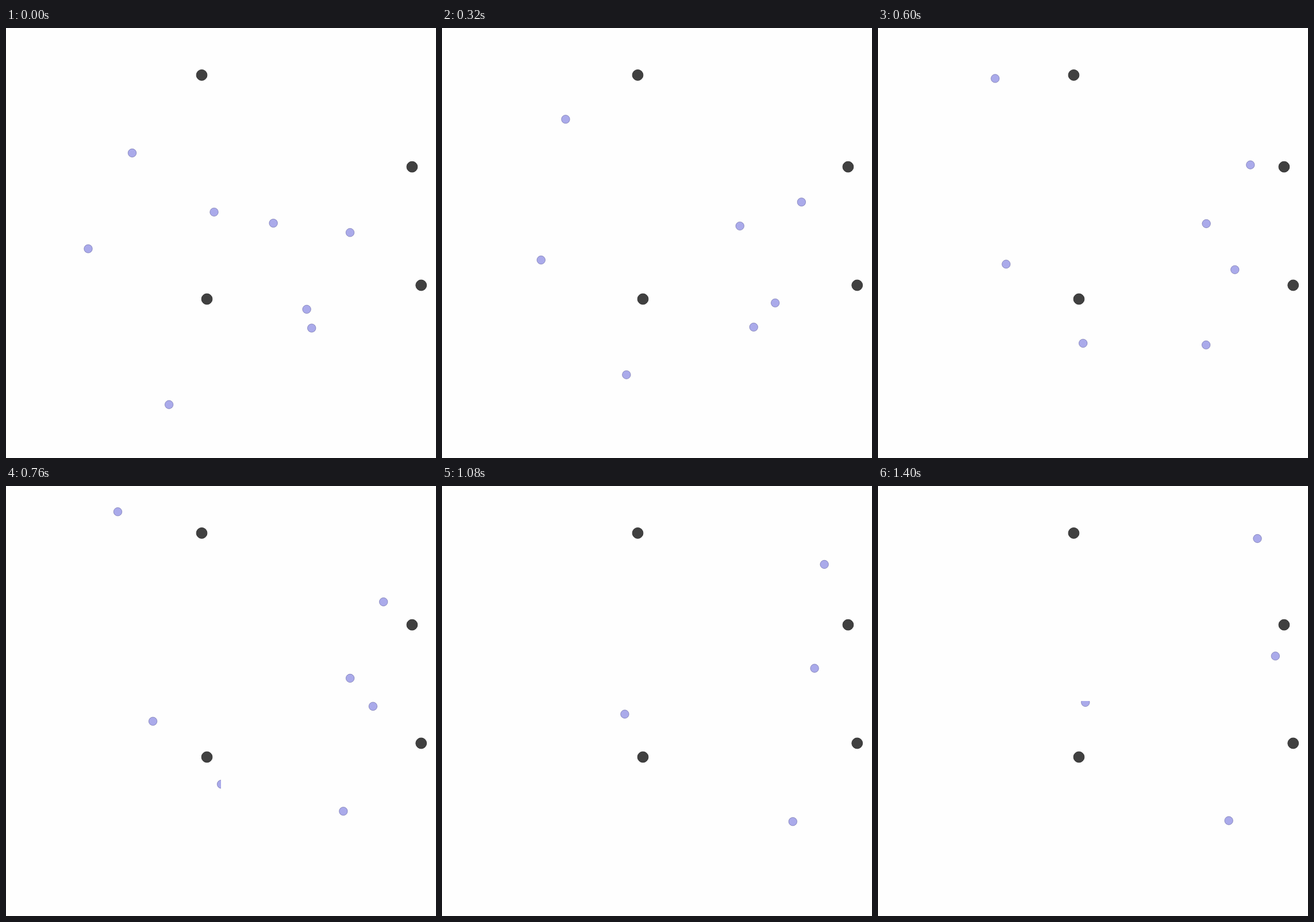
Write an HTML page with a canvas that moves like this. It is 748 px wide and 748 px high and loops after 1440 ms.

```html
<!DOCTYPE html>
<html>
<head>
<meta charset="utf-8">
<style>
  html, body { margin: 0; width: 100%; height: 100%; overflow: hidden; background: #fefefe; }
  canvas { display: block; }
</style>
</head>
<body>
<canvas id="stage" width="748" height="748"></canvas>
<script>
const ctx = document.getElementById('stage').getContext('2d');
const SIZE = 748, HALF = SIZE / 2, LOOP = 1440, STEP = 40, RAMP = 140;

// One fixed obstacle per panel
const obstacles = [[340.5, 81.9], [706.4, 241.5], [349.5, 471.5], [722.2, 447.5]];

// Each particle follows the polynomial through its points at these shared times
const keyTimes = [0, 370, 850, 1330];
const particles = [
  [[219.5, 217.4], [211, 129], [183, 0]],
  [[362, 320.2], [403.4, 287.2]],
  [[143, 384], [192.4, 408.4], [288, 404.4], [360.8, 376.4]],
  [[283.6, 655.1], [337, 579.3], [390.3, 490.2]],
  [[465.1, 339.5], [541.7, 343.8], [624.2, 326.5], [691.3, 295.8]],
  [[598.5, 355.8], [636, 275.3], [662.5, 167.2], [660, 91.4]],
  [[523.1, 489.3], [554, 534.3], [600.6, 576.8], [610.2, 582.1]],
  [[531.7, 522], [598.9, 454.6], [651.7, 343]]
];

// Particles start at rest and speed up evenly during the ramp
const warp = t => t < RAMP ? t * t / (2 * RAMP) : t - RAMP / 2;

// Lagrange weight of key i among the first n keys
function weight(i, n, t) {
  let w = 1;
  for (let j = 0; j < n; j++) {
    if (j !== i) w *= (t - keyTimes[j]) / (keyTimes[i] - keyTimes[j]);
  }
  return w;
}

const position = (points, t) => [0, 1].map(axis =>
  points.reduce((sum, p, i) => sum + p[axis] * weight(i, points.length, t), 0));

function dot([x, y], r, fill, stroke) {
  ctx.beginPath();
  ctx.arc(x, y, r, 0, 2 * Math.PI);
  ctx.fillStyle = fill;
  ctx.fill();
  ctx.strokeStyle = stroke;
  ctx.stroke();
}

function draw(t) {
  ctx.fillStyle = '#fefefe';
  ctx.fillRect(0, 0, SIZE, SIZE);
  for (const centre of obstacles) dot(centre, 9.4, '#404040', '#383838');
  for (const points of particles) {
    // A particle is visible only in the panel where it starts
    const panel = points[0].map(v => v < HALF ? 0 : HALF);
    ctx.save();
    ctx.beginPath();
    ctx.rect(...panel, HALF, HALF);
    ctx.clip();
    dot(position(points, warp(t)), 7.3, 'rgba(0,0,195,.33)', 'rgba(0,0,80,.3)');
    ctx.restore();
  }
}

const start = performance.now();
function tick() {
  const t = (performance.now() - start) % LOOP;
  draw(Math.floor(t / STEP) * STEP);
  requestAnimationFrame(tick);
}
tick();
</script>
</body>
</html>
```
